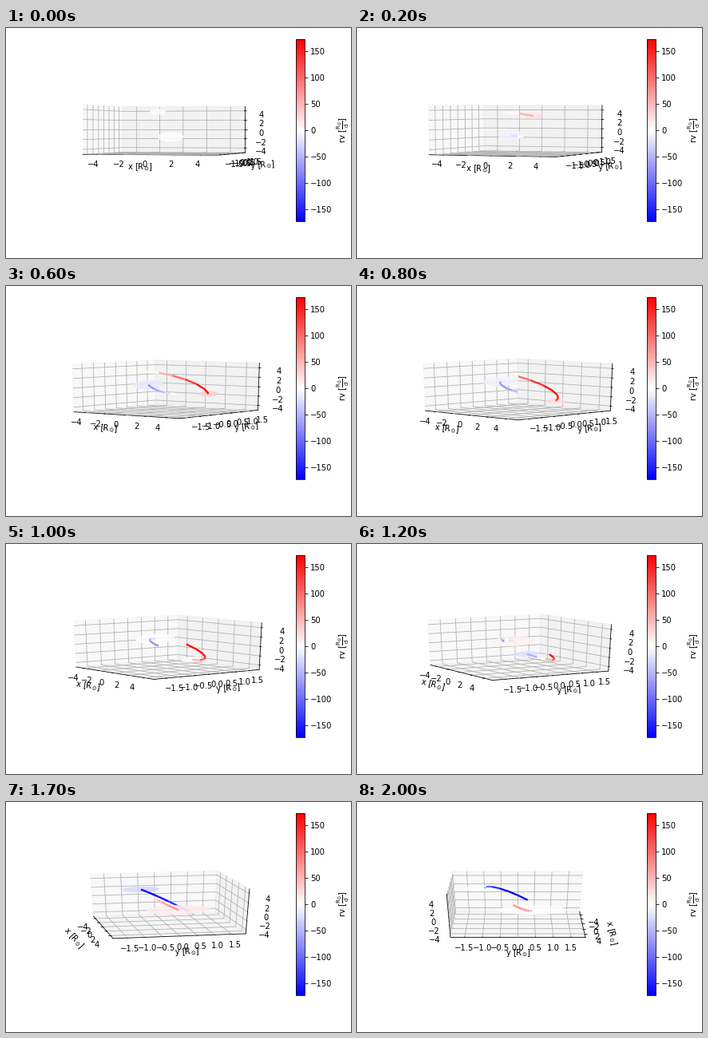
These frames come from a looping animation (432 px wide and 288 px high, 2.1 s). A matplotlib script:

```python
import numpy as np
import matplotlib.pyplot as plt
from matplotlib.animation import FuncAnimation
from matplotlib.cm import ScalarMappable
from matplotlib.collections import LineCollection
from matplotlib.colors import Normalize

W, H, DPI = 432, 288, 72
FRAMES, PERIOD, TRAIL = 21, 20, 6

# Perspective view of a unit box, stretched to the panel
CX, CY, SX, SY, DIST = 201.4, 127, 159, 57.8, 10
SPAN = np.array([10, 3.65, 9.6])
EDGE = 0.5 + 1 / 48
DELTA = 1 / 12
TICK_PAD, LABEL_PAD = 0.1116, 0.2427

TICKS = [np.arange(-4, 5, 2), np.arange(-1.5, 1.6, 0.5), np.arange(-4, 5, 2)]
FORMATS = ["{:.0f}", "{:.1f}", "{:.0f}"]
NAMES = [r"x [$\mathrm{R_{\odot}}$]", r"y [$\mathrm{R_{\odot}}$]", ""]
PANES = [0.95, 0.90, 0.925]
# Axis edge: coordinate flipped to the near side; direction of tick marks
FLIP, TICK_DIR = [1, 0, 0], [1, 0, 0]

INCL = np.radians(75)
RV_MAX = 173.3
# Orbit size (signed), radius, velocity share
STARS = [(-1.645, 1.0, -0.45), (3.655, 0.6, 1.0)]
CMAP = plt.get_cmap("bwr")

fig = plt.figure(figsize=(W / DPI, H / DPI), dpi=DPI, facecolor="white")
ax = fig.add_axes([0, 0, 1, 1])
cax = fig.add_axes([363.2 / W, 1 - 242 / H, 10.8 / W, 228 / H])
fig.colorbar(ScalarMappable(Normalize(-RV_MAX, RV_MAX), CMAP), cax=cax,
             label=r"rv [$\mathrm{\frac{R_{\odot}}{d}}$]")


class View:
    def __init__(self, azim, elev):
        a, e = np.radians([azim, elev])
        ca, sa, ce, se = np.cos(a), np.sin(a), np.cos(e), np.sin(e)
        self.cam = np.array([ce * ca, ce * sa, se])
        self.right = np.array([-sa, ca, 0])
        self.up = np.array([-se * ca, -se * sa, ce])

    def near(self, pts):
        return np.asarray(pts) @ self.cam

    def project(self, pts):
        pts = np.asarray(pts, float)
        d = 1 - self.near(pts) / DIST
        return np.stack([CX + SX * (pts @ self.right) / d,
                         CY - SY * (pts @ self.up) / d], axis=-1)


def rv_color(v):
    return CMAP(0.5 + 0.5 * np.asarray(v))


def orbit(a, phase):
    return np.stack([a * np.sin(phase),
                     -a * np.cos(phase) * np.cos(INCL),
                     a * np.cos(phase) * np.sin(INCL)], axis=-1)


def replaced(p, i, value):
    q = np.array(p, float)
    q[i] = value
    return q


def outward(p, axis, pad):
    q = p + np.where(p < 0, -pad, pad)
    q[axis] = p[axis]
    return q


def draw_pane(view, far, i):
    j, k = (i + 1) % 3, (i + 2) % 3
    corners = []
    for sj, sk in [(1, 1), (1, -1), (-1, -1), (-1, 1)]:
        corners.append(replaced(replaced(far, j, sj * EDGE), k, sk * EDGE))
    shade = (PANES[i],) * 3 + (0.5,)
    ax.add_patch(plt.Polygon(view.project(corners), fc=shade, ec=shade, lw=1))


def draw_axis(view, far, i):
    start = replaced(far, FLIP[i], -far[FLIP[i]])
    start[i] = far[i]
    ends = view.project([start, replaced(start, i, -start[i])])
    ax.plot(*ends.T, color="black", lw=0.8)

    if NAMES[i]:
        dx, dy = ends[1] - ends[0]
        angle = np.degrees(np.arctan2(-dy, dx)) % 180
        if angle > 90:
            angle -= 180
        mid = outward(replaced(start, i, 0), i, LABEL_PAD)
        ax.text(*view.project(mid), NAMES[i], rotation=angle,
                ha="center", va="center")

    grid, marks = [], []
    j, k, t = (i + 1) % 3, (i + 2) % 3, TICK_DIR[i]
    sign = np.sign(far[t])
    for value in TICKS[i]:
        u = value / SPAN[i]
        p = replaced(far, i, u)
        grid.append(view.project([replaced(p, j, -p[j]), p,
                                  replaced(p, k, -p[k])]))
        p = replaced(start, i, u)
        marks.append(view.project(
            [replaced(p, t, p[t] + 0.1 * sign * DELTA),
             replaced(p, t, p[t] - 0.2 * sign * DELTA)]))
        text = FORMATS[i].format(value).replace("-", "\u2212")
        ax.text(*view.project(outward(p, i, TICK_PAD)), text,
                ha="center", va="top")
    ax.add_collection(LineCollection(grid, colors="#b0b0b0", lw=0.8, zorder=2))
    ax.add_collection(LineCollection(marks, colors="black", lw=0.8, zorder=2))


def star_items(view, n):
    """Discs and trails as (depth, artist), far to near."""
    items = []
    w = view.cam / SPAN
    w /= np.linalg.norm(w)
    e1 = np.cross(w, [0, 0, 1])
    e1 /= np.linalg.norm(e1)
    e2 = np.cross(w, e1)
    a = np.linspace(0, 2 * np.pi, 80)[:, None]
    ring = np.cos(a) * e1 + np.sin(a) * e2
    # One straight trail piece per time step
    phases = 2 * np.pi * np.arange(max(0, n - TRAIL), n + 1) / PERIOD

    for orb, radius, share in STARS:
        path = orbit(orb, phases)
        disc = plt.Polygon(view.project((path[-1] + radius * ring) / SPAN),
                           fc=rv_color(0.2 * share * np.sin(phases[-1])),
                           ec="none", alpha=0.85)
        depth = view.near(path / SPAN)
        items.append((depth[-1], disc))
        if n:
            xy = view.project(path / SPAN)
            line = LineCollection(np.stack([xy[:-1], xy[1:]], axis=1),
                                  colors=rv_color(share * np.sin(phases[:-1])),
                                  lw=2.3)
            items.append((depth.max(), line))
    return sorted(items, key=lambda item: item[0])


def draw(n):
    ax.cla()
    ax.set(xlim=(0, W), ylim=(H, 0))
    ax.axis("off")
    s = n / (FRAMES - 1)
    azim, elev = -75 * (1 - s), 30 * s
    view = View(azim, elev)
    far = EDGE * np.array([-1, 1 if azim < 0 else -1, -1])
    for i in range(3):
        draw_pane(view, far, i)
    for i in range(3):
        draw_axis(view, far, i)
    for z, (_, artist) in enumerate(star_items(view, n)):
        artist.set_zorder(4 + z)
        ax.add_artist(artist)
    return []


anim = FuncAnimation(fig, draw, frames=FRAMES, interval=100,
                     repeat=True, repeat_delay=0, blit=False)
plt.show()
```
